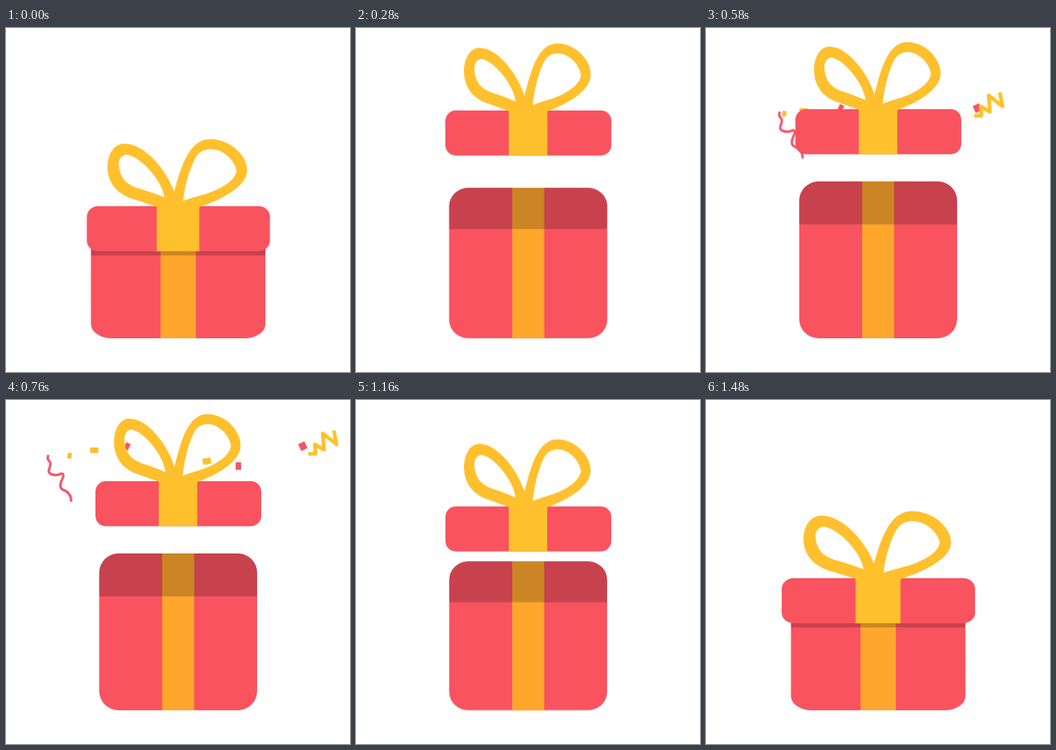
An HTML page that plays this animation: 500 by 500 pixels, repeating every 1520 ms.

```html
<!DOCTYPE html>
<html lang="en">
<head>
<meta charset="utf-8">
<title>Gift box</title>
<style>
  html, body { margin: 0; height: 100%; overflow: hidden; background: #fff; }
  svg { display: block; width: 100vw; height: 100vh; }

  .red { fill: #f9535f; }
  .yellow { fill: #ffc02d; }
  .orange { fill: #ffa62d; }
  .shade { fill: #000; fill-opacity: .2; }
  .line { fill: none; stroke-linejoin: round; }

  .lift, .lid, .box, .tall, .bit { animation: 1520ms ease-in-out infinite; }
  .lid, .box, .tall { transform-origin: 250px 451px; }
  .lift { animation-name: lift; }
  .lid { animation-name: lid; }
  .box { animation-name: box; }
  .tall { animation-name: tall; }
  .bit { animation-name: fly; animation-timing-function: linear; }

  @keyframes lift {
    0%, 88.55%, 100% { transform: translateY(141px); }
    20.13%, 69.74% { transform: none; }
  }
  @keyframes lid {
    0% { transform: scaleX(1.104); }
    20.13%, 76.32% { transform: scaleX(1); }
    97.37%, 100% { transform: scaleX(1.166); }
  }
  @keyframes box {
    0%, 97.37%, 100% { transform: scaleX(1.105); }
    20.13%, 76.32% { transform: scaleX(1); }
  }
  @keyframes tall {
    0%, 1.97%, 92.11%, 100% { transform: scaleY(.728); }
    24.54%, 69.74% { transform: scaleY(1); }
  }
  /* inside the box, leaving, rising, highest point, falling, inside again */
  @keyframes fly {
    0%, 19.74%, 73.68%, 100% {
      transform: translate(var(--home), 330px) rotate(var(--ra));
    }
    27.63% { transform: translate(var(--a)) rotate(var(--ra)); }
    38.16% {
      transform: translate(var(--b)) rotate(var(--rb));
      animation-timing-function: cubic-bezier(.3, .53, .6, 1);
    }
    48.68% {
      transform: translate(var(--c)) rotate(var(--rb));
      animation-timing-function: cubic-bezier(.4, 0, .7, .5);
    }
    63.16% { transform: translate(var(--d)) rotate(var(--rd)); }
  }
</style>
</head>
<body>
<svg viewBox="0 0 500 500">
  <g class="red">
    <rect class="bit yellow" x="-3" y="-4" width="6" height="8"
      style="--home:180px; --a:137px,206px; --b:114px,125px; --c:92px,80px; --d:130px,177px; --ra:-25deg; --rb:10deg; --rd:-5deg"/>
    <path class="bit line" stroke="#f9506a" stroke-width="3.5"
      d="M-15-33q-3 6 2 10c4 6-7 14 2 18q8 3 14-1q6 0 2 8c-4 8-4 14 2 16q11 4 11 17"
      style="--home:200px; --a:167px,225px; --b:123px,155px; --c:76px,112px; --d:160px,202px; --ra:0deg; --rb:0deg; --rd:0deg"/>
    <rect class="bit yellow" x="-6" y="-4" width="12" height="8"
      style="--home:200px; --a:163px,214px; --b:142px,121px; --c:128px,72px; --d:158px,182px; --ra:25deg; --rb:0deg; --rd:15deg"/>
    <rect class="bit" x="-3.5" y="-5" width="7" height="10"
      style="--home:225px; --a:208px,210px; --b:196px,117px; --c:176px,66px; --d:176px,203px; --ra:30deg; --rb:25deg; --rd:60deg"/>
    <rect class="bit" x="-4" y="-5.5" width="8" height="11"
      style="--home:270px; --a:292px,214px; --b:316px,142px; --c:338px,95px; --d:317px,201px; --ra:30deg; --rb:0deg; --rd:-30deg"/>
    <rect class="bit yellow" x="-6" y="-4.5" width="12" height="9"
      style="--home:265px; --a:281px,218px; --b:286px,140px; --c:292px,88px; --d:285px,188px; --ra:-20deg; --rb:-10deg; --rd:-25deg"/>
    <rect class="bit" x="-5" y="-5.5" width="10" height="11"
      style="--home:310px; --a:366px,212px; --b:394px,117px; --c:432px,66px; --d:377px,180px; --ra:-45deg; --rb:-25deg; --rd:-20deg"/>
    <path class="bit line" stroke="#ffc02d" stroke-width="5.5"
      d="M7-22L17-4L-7-13L2 9L-13 6L-8 18L-18 22"
      style="--home:305px; --a:356px,202px; --b:413px,113px; --c:464px,62px; --d:374px,169px; --ra:0deg; --rb:18deg; --rd:0deg"/>
  </g>

  <g class="box"><g class="tall">
    <rect class="red" x="135.5" y="223" width="229.5" height="228" rx="28"/>
    <rect class="orange" x="227" y="223" width="46.5" height="228"/>
    <path class="shade" d="M135.5 285.5V251a28 28 0 0 1 28-28H337a28 28 0 0 1 28 28V285.5Z"/>
  </g></g>

  <g class="lift"><g class="lid">
    <rect class="red" x="130" y="118" width="241" height="65.5" rx="15"/>
    <rect class="yellow" x="222" y="118" width="56" height="65.5"/>
    <path class="yellow" fill-rule="evenodd" d="
      M245 97C236 68 208 28 180 27C164 27 157 45 157 62C158 92 178 104 195 109C205 113 216 116 222 119
      H279C300 111 341 92 341 66C341 42 316 20 292 20.500C262 21 252 70 245 97Z
      M232 105C229 80 200 45 182 43C174 44 172 52 172 58C174 84 190 90 204 94C214 98 224 101 232 105Z
      M257 110C259 84 270 45 280 39C288 34 296 34 303 37C316 42 326 56 327 67C324 84 300 96 284 101C274 104 265 107 257 110Z"/>
  </g></g>
</svg>
</body>
</html>
```
